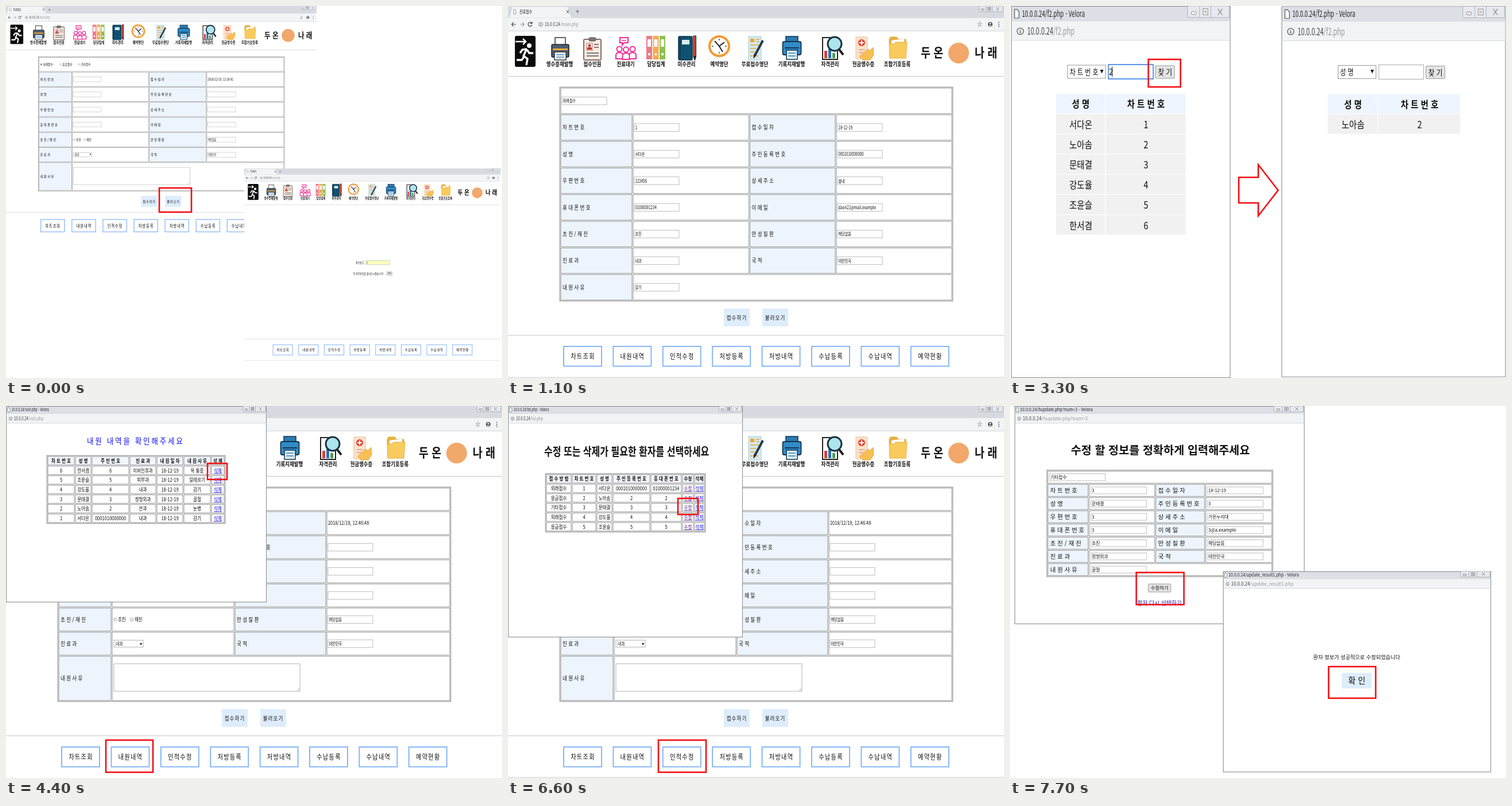
Recreate the animation shown at these times as an HTML page. Size 864 by 648 pixels, loop 8 s.

```html
<!DOCTYPE html>
<html lang="ko">
<head>
<meta charset="utf-8">
<title>진료접수</title>
<style>
  html, body { margin: 0; height: 100%; overflow: hidden; background: #fff; }
  svg { display: block; width: 100vw; height: 100vh; }
  text { font-family: "Noto Sans CJK KR", "Noto Sans CJK", "Noto Sans", sans-serif; white-space: pre; }
</style>
</head>
<body>
<svg id="stage" viewBox="0 0 864 648"></svg>
<script>
const STEP = 1100, LOOP = 8000;
const HOST = '10.0.0.24', BROWSER = 'Velora';
const PALE = '#edf4fc', BUTTON = '#deedfb', LINE = '#888';
const NAMES = ['서다온', '노아솜', '문태결', '강도율', '조윤슬', '한서겸'];
const PHONE = '01000001234', RESIDENT = '0001010000000';

// y is the vertical middle of the text; a is the aspect of the screenshot it belongs to
const text = (x, y, s, size, { a = .85, fill = '#111', w = 400, ls = 0, at = 'start', extra = '' } = {}) =>
  `<text transform="translate(${x} ${y + size * .37}) scale(${a} 1)" font-size="${size}" fill="${fill}" font-weight="${w}" letter-spacing="${ls}" text-anchor="${at}" ${extra}>${s}</text>`;
const mid = (x, y, s, size, o) => text(x, y, s, size, { at: 'middle', ...o });
const rect = (x, y, w, h, fill = 'none', stroke = 'none', sw = 1, rx = 0) =>
  `<rect x="${x}" y="${y}" width="${w}" height="${h}" fill="${fill}" stroke="${stroke}" stroke-width="${sw}" rx="${rx}"/>`;
const circle = (x, y, r, fill = 'none', stroke = 'none', sw = 1) =>
  `<circle cx="${x}" cy="${y}" r="${r}" fill="${fill}" stroke="${stroke}" stroke-width="${sw}"/>`;
const path = (d, stroke = '#111', sw = 1, fill = 'none') =>
  `<path d="${d}" stroke="${stroke}" stroke-width="${sw}" fill="${fill}"/>`;
const group = (x, y, k, body) => `<g transform="translate(${x} ${y}) scale(${k})">${body}</g>`;
const mark = (x1, y1, x2, y2) => rect(x1 + 1, y1 + 1, x2 - x1 - 2, y2 - y1 - 2, 'none', '#f40c10', 2.6);
const info = (x, y, r) => circle(x, y, r, 'none', '#555', r * .22) + path(`M${x} ${y - r * .5}v${r * .25}M${x} ${y - r * .1}v${r * .65}`, '#555', r * .3);
const docIcon = (x, y, k) => path(`M${x} ${y - 3.8 * k}h${2.2 * k}l${1.6 * k} ${2 * k}v${5.6 * k}h${-3.8 * k}z`, '#555', .6 * k, '#fff');
const address = (x, y, file, size, a) =>
  text(x, y, `${HOST}<tspan fill="#999">/${file}</tspan>`, size, { a, fill: '#444' });

function windowButtons(right, y, k, a) {
  const w = 52 * k * a, h = 10 * k, x = right - w, c = i => x + w * [.15, .43, .78][i], m = y + h / 2;
  return rect(x, y, w, h, '#e6e9ee', '#9aa0a8', .7, k) +
    path(`M${x + w * .29} ${y}v${h}M${x + w * .56} ${y}v${h}`, '#9aa0a8', .7) +
    rect(c(0) - 3 * k * a, m, 6 * k * a, 2.4 * k, '#fff', '#666', .8, .8 * k) +
    rect(c(1) - 3 * k * a, m - 2.6 * k, 6 * k * a, 5.2 * k, '#fff', '#666', .8) +
    rect(c(1) - k * a, m - .8 * k, 2 * k * a, 1.6 * k, 'none', '#666', .7) +
    mid(c(2), m, '×', 9 * k, { a, fill: '#777' });
}

function popup(x, y, w, h, file, k = 1, a = .7) {
  const title = 13 * k, bar = 17 * k;
  return rect(x + .5, y + .5, w - 1, h - 1, '#fff', '#85898e', 1) +
    rect(x + 1, y + 1, w - 2, title, '#dce0e6') +
    rect(x + 1, y + title, w - 2, bar, '#f2f3f5') +
    path(`M${x} ${y + title}h${w}M${x} ${y + title + bar}h${w}`, '#cfd2d6', .8) +
    docIcon(x + 3 * k, y + 6.7 * k, k) +
    text(x + 9.5 * k, y + 6.7 * k, `${HOST}/${file} - ${BROWSER}`, 7.5 * k, { a, fill: '#222' }) +
    info(x + 8 * k, y + 22 * k, 2.8 * k) +
    address(x + 14 * k, y + 22 * k, file, 8.5 * k, a) +
    windowButtons(x + w - 2, y, k, Math.min(1, a + .06));
}

const cell = (x1, y1, x2, y2, fill = '#fff') => rect(x1 + 1, y1 + 1, x2 - x1 - 2, y2 - y1 - 2, fill, LINE, .9);
const frame = (x1, y1, x2, y2) => rect(x1 - .8, y1 - .8, x2 - x1 + 1.6, y2 - y1 + 1.6, '#fff', LINE, 1);

const LABELS = ['차 트 번 호', '접 수 일 자', '성 명', '주 민 등 록 번 호', '우 편 번 호', '상 세 주 소',
  '휴 대 폰 번 호', '이 메 일', '초 진 / 재 진', '만 성 질 환', '진 료 과', '국 적'];
const PAGE_STYLE = { size: 10, a: .85, iw: 78, ih: 13.5, isize: 8.5, ia: .72, pad: 3 };
const POPUP_STYLE = { size: 10.4, a: 1, iw: 97, ih: 12, isize: 8, ia: .96, pad: 4 };

// values: heading, one per label, closing row; a string becomes an input box, a function draws itself
function form(xs, ys, values, st = PAGE_STYLE) {
  const middle = i => (ys[i] + ys[i + 1]) / 2;
  const label = (c, r, s) => cell(xs[c], ys[r], xs[c + 1], ys[r + 1], PALE) +
    text(xs[c] + st.pad + 1, middle(r), s, st.size, { a: st.a });
  const field = (c, r, end, v) => {
    const x = xs[c] + st.pad, y = middle(r);
    return cell(xs[c], ys[r], xs[end], ys[r + 1]) + (typeof v === 'function' ? v(x, y) :
      rect(x, y - st.ih / 2, st.iw, st.ih, '#fff', '#b5b5b5', .9) + text(x + 1.5, y, v, st.isize, { a: st.ia }));
  };
  let out = frame(xs[0], ys[0], xs[4], ys[8]) + field(0, 0, 4, values[0]);
  LABELS.forEach((s, i) => {
    const r = 1 + (i >> 1), c = i % 2 * 2;
    out += label(c, r, s) + field(c + 1, r, c + 2, values[i + 1]);
  });
  return out + label(0, 7, '내 원 사 유') + field(1, 7, 4, values[13]);
}

const steps = (start, pitch) => Array.from({ length: 9 }, (_, i) => start + pitch * i);
const radio = (x, y, s, on) => circle(x, y, 2.8, '#eee', '#999', .7) + (on ? circle(x, y, 1.4, '#333') : '') +
  text(x + 5, y, s, 8.8, { a: .85 });

const blankForm = clock => form([91, 184, 398, 558, 774], [142, 183, 225, 267, 309, 351, 393, 435, 514], [
  (x, y) => radio(98, y, '외래접수', true) + radio(152, y, '응급접수') + radio(203, y, '기타접수'),
  '', (x, y) => text(x, y, `2018/12/19, ${clock}`, 9, { a: .82 }), '', '', '', '', '', '',
  (x, y) => radio(190, y, '초진') + radio(219, y, '재진'), '해당없음',
  (x, y) => rect(188, y - 6, 51, 12, '#fff', '#aaa', .9) + text(191, y, '내과', 8.5, { a: .8 }) + mid(235, y, '▼', 5),
  '대한민국',
  () => rect(188, 449, 324, 48, '#fff', '#aaa', .9) + path('M507 496l4-4M509.500 496l1.500-1.500', '#888', .7),
]);

const filledForm = () => form([91, 217, 420.5, 571, 774], steps(142, 46.4), [
  '외래접수', '1', '18-12-19', NAMES[0], RESIDENT, '123456', '솔내', PHONE, 'daon21@mail.example',
  '초진', '해당없음', '내과', '대한민국', '감기']);

const person = (x, y) => circle(x, y, 4.5, '#fff', '#ee2a94', 2) + path(`M${x - 6} ${y + 17}v-6q0-5 6-5t6 5v6z`, '#ee2a94', 2, '#fff');
const binder = (x, fill) => rect(x, 52, 10, 41, fill) + rect(x + 2, 58, 6, 13, '#fff') + circle(x + 5, 84, 2.2, '#fff');
const ICONS = [
  // exit
  rect(12, 52, 36, 54, '#0b0b0b', 'none', 0, 3) + circle(37, 69, 4, '#fff') +
    path('M13 62h18m-5-5l5 5-5 5', '#fff', 2.5) +
    path('M32 76l-5 11 7 5-2 11M28 88l-4 6h-9M33 75l-8 1-4 6M33 76l4 6h7', '#fff', 3.4),
  // printer
  rect(82, 55, 18, 14, '#fff', '#333', 1.5) + rect(76, 67, 30, 22, '#4c5f70', '#222', 1.5, 2) + rect(78, 74, 26, 3, '#f2a83b') +
    rect(81, 80, 20, 14, '#fff', '#333', 1.5) + path('M84 85h14M84 89h14', '#2f80b5', 1.5),
  // clipboard
  rect(132, 58, 30, 36, '#f7ebe3', '#8a6d64', 2, 2) + rect(141, 55, 12, 6, '#777', '#555', 1, 2) +
    rect(137, 65, 10, 12, '#fff', '#c66', 1) + circle(142, 69, 2.5, '#b33') + rect(138, 72, 8, 4, '#c0392b') +
    path('M150 67h8M150 72h8M137 82h21M137 87h21', '#555', 1.5),
  // waiting people
  path('M195 55h14v9h-7l-3 4v-4h-4z', '#ee2a94', 2, '#fff') + path('M198 60h8', '#ee2a94', 1.5) +
    person(194, 75) + person(217, 75) + person(205.5, 76),
  // binders
  binder(241, '#f0788a') + binder(252.500, '#f7a94b') + binder(264, '#8cc152'),
  // notebook
  rect(297, 53, 24, 41, '#0f5270', '#082f42', 1.5, 2) + rect(303, 59, 13, 8, '#d9edf2') + path('M300 54v39', '#0a3a52', 1.5) +
    rect(323, 52, 4.5, 36, '#d6402f', '#222', 1) + path('M323 88h4.500l-2 7z', '#222', 1, '#222'),
  // clock
  circle(368, 70, 17, '#fff', '#f29a2e', 4) + path('M368 57v3M368 80v3M355 70h3M378 70h3', '#555', 1.5) + path('M360 61l8 9 9-7M368 70l6 10', '#222', 2),
  // paper and pen
  rect(419, 53, 22, 41, '#d5e9ee', '#a9cbd4', 1) + rect(422, 57, 7, 6, '#f2a02e') + path('M432 58h6M432 62h6M422 68h15M422 74h11M422 80h8M422 87h14', '#e8a23b', 1.5) +
    path('M444 60L430 86', '#1f3b52', 4) + path('M429 84l3 2-4 5z', '#222', 1, '#222'),
  // blue printer
  rect(484, 53, 21, 14, '#2b7bb0', '#12344d', 1.5) + rect(478.500, 62, 32, 23, '#2f8bc7', '#12344d', 1.8, 3) + path('M482 73h25', '#12344d', 2) +
    rect(485, 77, 19, 16, '#dff0f8', '#12344d', 1.5) + path('M488 82h13M488 87h13', '#2b7bb0', 1.5),
  // chart and magnifier
  rect(548, 55, 26, 38, '#fff', '#222', 2) + rect(551, 78, 5, 13, '#d8413a') + rect(558, 72, 5, 19, '#2b6fb5') + rect(565, 82, 5, 9, '#4a9a55') +
    path('M577 76l7 9', '#222', 4) + circle(569, 66, 12, '#aee4ee', '#1b3440', 3),
  // receipt
  path('M606 54h20v38l-4-2-3 3-4-3-4 3-5-2z', '#efb98f', 1, '#fde3cb') + circle(616, 64, 6, '#e2463f') + path('M616 60v8M612 64h8', '#fff', 2) +
    path('M611 76h11M611 81h8', '#d99', 1.5) + path('M621 80l6-5 3 3 6-6 1 13-6 9h-13l-6-6z', '#eaa63c', 1, '#f8bf57'),
  // folder
  path('M664 59l2-5h11l3 4h13v8h-29z', '#dca936', 1, '#e5b23e') + path('M668 60l22-3v12h-22z', '#ddd', .5, '#fff') +
    path('M664 66h9l2-3h20l-2 28h-28z', '#e4b140', 1, '#f8cb5c'),
].join('');

const TOOLS = [['영수증재발행', 90], ['접수인원', 147], ['진료대기', 205], ['담당집계', 258], ['미수관리', 311], ['예약명단', 368],
  ['무료접수명단', 430], ['기록지재발행', 494], ['자격관리', 561], ['현금영수증', 619], ['조합기호등록', 678]];
const MENU = ['차트조회', '내원내역', '인적수정', '처방등록', '처방내역', '수납등록', '수납내역', '예약현황'];

function page(body, { dy = 1, actions = true, foot = false } = {}) {
  const action = (x, s) => rect(x, 527 + dy, 45, 31, BUTTON) + mid(x + 22.5, 543 + dy, s, 10, { ls: 1.3, w: 500 });
  return rect(0, 0, 864, 648, '#fff') +
    rect(0, 0, 864, 21, '#d7dbe1') + path('M2 21l5-20h97l7 20z', '#c3c7cd', .6, '#f3f4f6') +
    docIcon(10, 10, 1) + text(20, 10, '진료접수', 8, { a: .75 }) + mid(104, 10, '×', 9) + mid(121, 10, '+', 14, { fill: '#555' }) +
    windowButtons(862, 0, 1, .8) +
    rect(0, 21, 864, 22, '#f3f4f6') + path('M0 43.500h864', '#d0d3d7', 1) +
    path('M14 32H6.500m3-3.500l-3 3.500 3 3.500', '#444', 1.2) + path('M21 32h7m-3-3.500l3 3.500-3 3.500', '#999', 1.2) +
    path('M41.500 30a3.500 3.500 0 1 0 .3 3M42 27.500v3h-3', '#444', 1.2) + info(57, 32, 3.4) +
    address(64, 32, 'main.php', 9, .72) + mid(822, 31.5, '☆', 10, { fill: '#444' }) +
    circle(840, 32, 4, '#555') + circle(840, 31, 1.4, '#fff') + path('M837.500 34.500h5', '#fff', 1) +
    [28.5, 32, 35.5].map(y => circle(855, y, .9, '#555')).join('') +
    ICONS + TOOLS.map(([s, x]) => mid(x, 101, s, 10.5, { a: .8, w: 700 })).join('') +
    text(719, 81, '두 온', 22, { a: .84, w: 700 }) + circle(785, 82, 18, '#f2a76b') + text(813, 81, '나 래', 22, { a: .84, w: 700 }) +
    path('M0 122.500h864', '#c4c4c4', 1) + body +
    (actions ? action(376, '접수하기') + action(443, '불러오기') : '') +
    path(`M0 ${573.5 + dy}h864`, '#c8c8c8', 1) +
    MENU.map((s, i) => rect(97 + 86.4 * i, 593 + dy, 66, 34.5, '#fff', '#86b7f6', 2) +
      mid(130.5 + 86.4 * i, 610.5 + dy, s, 12, { ls: 1.5, w: 500 })).join('') +
    (foot ? path('M0 647h864', '#ccc', 1) : '');
}

const lookupBody = text(375, 317, '차트번호 :', 9, { a: .85 }) + rect(410, 310, 80, 14, '#faffbd', '#aaa', 1) + text(412, 317, '1', 8.5) +
  text(367, 354, '이 차트번호를 불러오시겠습니까?', 9, { a: .82 }) + rect(480, 348, 18, 12, '#e6e6e6', '#999', 1) + mid(489, 354, 'YES', 7.5);

// patient search window, drawn at its own origin
function finder({ xs, people, by, query = '', focus = false, w, h }) {
  const o = { a: .83 };
  const row = (r, cells, fill, weight) => cells.map((s, c) =>
    rect(xs[c], 153 + 35.2 * r, xs[c + 1] - xs[c] - 1.2, 34, fill) +
    mid((xs[c] + xs[c + 1]) / 2, 171 + 35.2 * r, s, 17.5, { ...o, w: weight })).join('');
  return popup(0, 0, w, h, 'f2.php', 2, .64) +
    rect(98.5, 103, 66, 23, '#fff', '#999') + text(102, 114.5, by, 13.8, { a: .8 }) + mid(158, 114, '▼', 8, { a: .8 }) +
    rect(169.5, 102, 78, 25, '#fff', focus ? '#5b95ec' : '#aaa', focus ? 2 : 1) +
    text(170.5, 114, query, 15, o) + (focus ? path('M176 105.500v18', '#111', 1) : '') +
    rect(251.5, 104, 33, 22, '#e4e4e4', '#999', 1, 1) + mid(268, 115, '찾 기', 14, o) +
    row(0, ['성 명', '차 트 번 호'], '#eef5fe', 700) +
    people.map((n, i) => row(i + 1, [NAMES[n], n + 1], '#f1f1f1', 400)).join('');
}
const everyone = { xs: [78, 164.5, 305], people: [0, 1, 2, 3, 4, 5], by: '차 트 번 호', w: 382, h: 648 };

function list(xs, top, pitch, head, rows) {
  const last = xs.length - 1, colors = { 수정: '#551a8b', 삭제: '#1414e0' };
  const line = (cells, r) => cells.map((s, c) => {
    const y = top + pitch * r, link = r && colors[s];
    return cell(xs[c], y, xs[c + 1], y + pitch, r ? '#fff' : '#f1f6fd') +
      mid((xs[c] + xs[c + 1]) / 2, y + pitch / 2, s, 9.4, {
        a: .8, w: r ? 400 : 700, fill: link || '#111', extra: link ? 'text-decoration="underline"' : '' });
  }).join('');
  return frame(xs[0], top, xs[last], top + pitch * (rows.length + 1)) + [head, ...rows].map(line).join('');
}

const DEPARTMENTS = ['내과', '안과', '정형외과', '내과', '피부과', '이비인후과'];
const REASONS = ['감기', '눈병', '골절', '감기', '알레르기', '목 통증'];
const WAYS = ['외래접수', '응급접수', '기타접수'];
const visits = count => text(141, 61, '내원 내역을 확인해주세요', 14, { a: .9, ls: 3, fill: '#1414f0', w: 500 }) +
  list([72, 120, 149, 215, 262, 309, 357, 381], 87, 16.7,
    ['차 트 번 호', '성 명', '주 민 번 호', '진 료 과', '내 원 일 자', '내 원 사 유', '삭 제'],
    NAMES.map((n, i) => [i + 1, n, i ? i + 1 : RESIDENT, DEPARTMENTS[i], '18-12-19', REASONS[i], '삭제']).slice(0, count).reverse());
const patients = list([66, 111, 154, 182, 248, 303, 324, 343], 118.5, 16.7,
  ['접 수 방 법', '차 트 번 호', '성 명', '주 민 등 록 번 호', '휴 대 폰 번 호', '수정', '삭제'],
  NAMES.slice(0, 5).map((n, i) => [WAYS[i % 3], i + 1, n, i ? i + 1 : RESIDENT, i ? i + 1 : PHONE, '수정', '삭제']));

const confirmation = (x, y, s) => mid(x, y, s, 9.2, { a: 1 }) + rect(x - 26, y + 27, 52, 27, BUTTON) +
  mid(x, y + 40, '확 인', 15, { a: .95, w: 500 });
const desk = page(blankForm('12:46:48'));
const deskFooted = page(blankForm('12:46:48'), { foot: true });

const scenes = [
  // reception form and chart lookup
  group(0, 0, .626, page(blankForm('12:18:42'))) + mark(266, 316, 324, 360) +
    group(415, 283, .517, page(lookupBody, { actions: false, foot: true })),
  // loaded chart
  page(filledForm(), { dy: 0, foot: true }),
  // search window over the desk
  deskFooted + group(0, 0, .6, finder(everyone)) + mark(88, 582, 171, 639),
  // search and its result
  group(2, 0, 1, finder({ ...everyone, query: '2', focus: true })) + mark(240, 92, 298, 142) +
    path('M398.500 298.500H432.500V276.500L467 321 432.500 365.500V343H398.500z', '#f40c10', 2.6, '#fff') +
    group(473, .5, 1, finder({ xs: [80.5, 168.5, 312.5], people: [1], by: '성 명', w: 390.5, h: 646 })) +
    rect(862, 0, 2, 0),
  // visit history
  desk + popup(0, 0, 454, 342, 'visit.php') + visits(6) + mark(350, 99, 386, 129) + mark(173, 581, 257, 639),
  // visit removed
  popup(8, 0, 505, 380, 'visit_del.php', 1, .93) + confirmation(260, 150, '내원 내역이 성공적으로 삭제되었습니다') + mark(218, 165, 302, 221) +
    popup(371, 288, 467, 350, 'visit.php', 1, .93) + group(376, 293, 1, visits(5)),
  // patient list
  deskFooted + popup(0, 0, 409, 403, 'hd.php') +
    text(63, 80, '수정 또는 삭제가 필요한 환자를 선택하세요', 20, { a: .8, w: 700 }) + patients +
    mark(295, 160, 332, 190) + mark(261, 581, 346, 639),
  // edit form and its confirmation
  popup(8, 0, 505, 380, 'hupdate.php?num=3', 1, .93) +
    text(106, 77, '수정 할 정보를 정확하게 입력해주세요', 19.7, { a: 1, w: 700 }) +
    form([65, 137, 253, 340, 457], steps(112.5, 23), ['기타접수', '3', '18-12-19', NAMES[2], '3', '3', '가온누리대', '3', '3@a.example',
      '초진', '해당없음', '정형외과', '대한민국', '골절'], POPUP_STYLE) +
    rect(241, 310, 39, 14, '#e4e4e4', '#999', 1, 1) + mid(260.5, 317, '수정하기', 8.3, { a: 1 }) +
    mid(260.5, 343, '환자 다시 선택하기', 9.8, { a: 1, fill: '#2a22b0' }) + mark(219, 289, 304, 347) +
    popup(371, 288, 467, 350, 'update_result1.php', 1, .93) +
    confirmation(604, 438, '환자 정보가 성공적으로 수정되었습니다') + mark(554, 453, 638, 510),
];

const stage = document.getElementById('stage');
stage.innerHTML = rect(0, 0, 864, 648, '#fff') + scenes.map(s => `<g display="none">${s}</g>`).join('');
const layers = stage.querySelectorAll(':scope > g');
const start = performance.now();
let shown = -1;

function tick() {
  const index = Math.floor((performance.now() - start) % LOOP / STEP);
  if (index !== shown) {
    layers.forEach((layer, i) => layer.setAttribute('display', i === index ? 'inline' : 'none'));
    shown = index;
  }
  requestAnimationFrame(tick);
}
tick();
</script>
</body>
</html>
```
